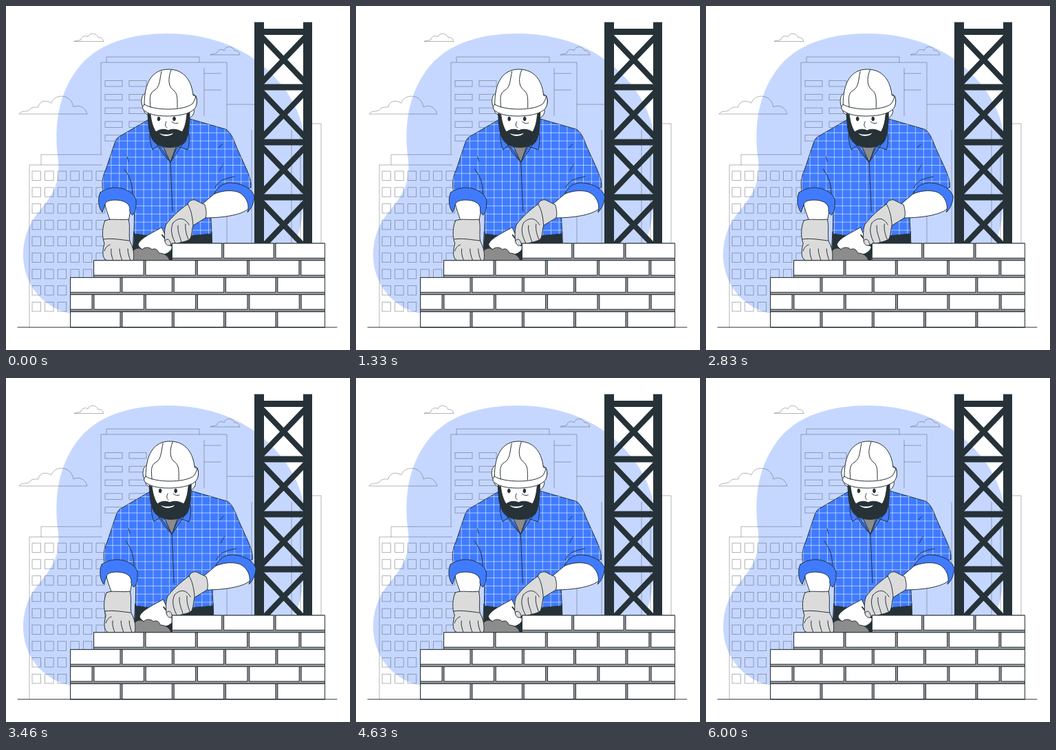
These frames come from a looping animation (500 by 500 pixels, 6.04 s). An HTML page:

```html
<!DOCTYPE html>
<html lang="en">
<head>
<meta charset="utf-8">
<title>Bricklayer</title>
<style>
html, body { margin: 0; width: 100%; height: 100%; overflow: hidden; background: #fff }
svg { display: block; width: 100vw; height: 100vh }
.thin { fill: none; stroke: #263238; stroke-opacity: .45; stroke-width: .8 }
.ink { stroke: #263238; stroke-width: 1; stroke-linejoin: round; stroke-linecap: round }
.line { fill: none }
.blue { fill: #407bff }
.check { fill: url(#check); stroke: none }
.white { fill: #fff }
.glove { fill: #dbdbdb }
.gray { fill: #8c8c8c }
.dark { fill: #263238 }
</style>
</head>
<body>
<svg viewBox="0 0 500 500">
  <defs>
    <pattern id="check" x="176" y="172" width="11.8" height="11.8" patternUnits="userSpaceOnUse">
      <path d="M0 .5H11.8M.5 0V11.8" stroke="#fff" stroke-opacity=".6" stroke-width=".9"/>
    </pattern>
    <path id="shirt" d="M209 164L166 189C161 191 159 196 157 202L146 235C142 246 138 252 141 270L187 282L186 331C220 337 262 335 299 331L297 290L304 270L356 264C357 254 353 246 350 238L335 205C331 194 326 182 319 179L267 164Z"/>
  </defs>

  <path fill="#c6d7ff" d="M235 40C186 40 132 52 102 94C76 130 70 174 75 217C80 251 72 270 51 295C31 318 22 344 26 375C31 412 60 441 95 447H420V345C436 310 437 240 434 195C430 148 402 109 366 81C335 57 290 40 235 40Z"/>

  <!-- skyline and clouds -->
  <g class="thin">
    <path d="M99 51.500C103 49 106 51 109 49C109 44 116 42 119 45C121 38 132 39 134 46C139 45 141 48 142 51.500Z"/>
    <path d="M297 71C301 69 304 70 307 68C307 63 314 62 317 65C319 57 330 58 332 65C337 64 339 68 340 71Z"/>
    <path d="M19 157C22 152 28 154 33 152C37 146 43 147 47 147C48 138 57 136 66 141C70 127 95 127 98 147C105 143 115 146 118 157Z"/>
    <path d="M146 82V74H281V82M138 215V82H321V345M288 90V160M288 98H313M288 122H313M321 143H361M357 180V345M445 171H458V345M415 180V345M428 180V345"/>
    <path d="M51 231V216H140M34 467V231H140"/>
    <g id="windows"></g>
  </g>

  <g class="dark">
    <path d="M361 23.500H375V345H361ZM432 23.500H445V345H432ZM375 33H432V42H375ZM375 113.500H432V122.500H375ZM375 193.500H432V202.500H375ZM375 273.500H432V282.500H375Z"/>
    <path fill="none" stroke="#263238" stroke-width="8" d="M372 45L435 111M435 45L372 111M372 125L435 191M435 125L372 191M372 205L435 271M435 205L372 271M372 285L435 351M435 285L372 351"/>
  </g>

  <g id="builder" class="ink">
    <path class="dark" d="M186 328H299L300 360H242V370H184Z"/>

    <!-- shirt -->
    <use href="#shirt" class="blue"/>
    <use href="#shirt" class="check"/>
    <path class="line" d="M239 227L242 298M172 237C180 249 183 254 184 274M176 219L178 226M304 264C308 256 312 252 332 248M309 206L314 201M310 240C313 234 314 232 316 230M297 292L296 281"/>
    <path class="gray" d="M228 202H248L239 227Z"/>
    <path class="blue" d="M212 174C209 182 207 193 213 209L222 202L239 227C230 218 222 208 216 194ZM264 176C267 188 267 200 264 209L249 204L239 227C247 215 256 204 261 192Z"/>

    <!-- head -->
    <path class="white" d="M205 147C198 146 199 157 207 158ZM266 147C276 143 276 160 266 163Z"/>
    <path class="white" d="M207 154H266C267 176 262 198 238 198C216 198 208 177 207 154Z"/>
    <path class="dark" d="M206 157C207 176 208 190 216 198C226 208 250 208 260 198C266 189 267 171 267 153L263 157C262 168 260 177 256 183C250 179 241 178 236 181C230 178 223 179 218 183C213 176 211 166 210 158Z"/>
    <path class="white" stroke="none" d="M223 185C230 188 238 187 243 184.500C240 190 228 190.500 223 185Z"/>
    <path class="line" d="M233 168C231 172 231 175 234 177M241 168C244 171 247 171 250 170"/>
    <ellipse class="dark" cx="222" cy="164" rx="1.800" ry="2.900"/>
    <ellipse class="dark" cx="244.500" cy="164" rx="1.800" ry="2.900"/>
    <path class="white" d="M203 127C197 127 195 140 199 147H274C279 143 279 130 272 128Z"/>
    <path class="white" d="M201 143C201 112 212 92 236 92C260 92 270 110 272 130L276 131C278 137 278 143 275 148C270 156 253 160 234 160C218 160 205 157 199 150C198 147 199 144 201 143Z"/>
    <path class="line" d="M201 143C214 152 258 153 271 142C274 138 275 134 276 131M226 95C223 108 224 118 215 123C208 127 209 136 210 147M240 93C235 106 236 117 243 122C250 127 249 136 249 148"/>

    <!-- trowel and mortar -->
    <path class="white" d="M226 322C212 330 196 337 192 346C193 353 202 357 222 362C232 362 239 358 242 351L231 332Z"/>
    <path class="line" stroke-width="2" d="M227 333L239 348"/>
    <path class="gray" d="M184 371V357C188 351 195 351 198 354C201 350 209 350 212 354C217 351 221 355 222 359C229 359 237 363 238 371Z"/>

    <!-- left arm -->
    <path class="white" d="M143 284C145 296 149 304 152 314H178C179 306 181 300 181 292L170 280H150Z"/>
    <path class="blue" d="M137 271C148 263 162 262 174 267C185 272 190 279 189 286C189 294 188 300 184 304C181 302 179 299 180 294C179 286 170 282 159 282C150 282 145 284 144 288L140 300C134 293 133 279 137 271Z"/>
    <path class="glove" d="M144 312C152 308 167 312 178 310C181 320 178 332 180 342C185 351 187 361 185 370H147C138 367 141 353 143 345C139 335 140 320 144 312Z"/>
    <path class="line" d="M142 339C154 337 168 340 179 341M153 353C152 359 154 365 156 370M165 353C165 359 167 365 169 370M177 353C177 359 179 365 181 370M143 356C144 352 147 348 151 347"/>

    <!-- right arm -->
    <path class="white" d="M284 289L304 272C320 266 340 266 350 274L354 293C346 303 318 308 288 308Z"/>
    <path class="blue" d="M303 273C307 262 318 256 329 257C346 259 358 266 361 277C360 287 357 294 351 300C355 288 348 274 336 270C325 267 312 269 303 273Z"/>
    <path class="glove" d="M264 288C266 283 270 281 275 282L289 289C291 296 292 303 290 308L272 319C270 324 271 331 268 338C263 343 253 343 247 346L240 347C236 350 232 347 231 342C230 333 230 324 233 317C241 307 251 297 264 288Z"/>
    <path class="line" d="M264 288C269 296 271 306 272 319M243 315C238 324 241 336 247 346M250 319C249 328 253 335 255 343M261 317C260 326 263 334 265 339M231 341C235 337 238 339 240 347M243 315C252 306 260 308 266 318"/>
  </g>

  <g id="wall" class="ink"></g>
  <path class="ink line" d="M17 467H481"/>
</svg>
<script>
const get = id => document.getElementById(id);
const rect = (x, y, w, h, fill) => `<rect x="${x}" y="${y}" width="${w}" height="${h}" fill="${fill}"/>`;

let panes = '';
for (let row = 0; row < 9; row++)
  for (let col = 0; col < 6; col++)
    panes += rect(38 + col * 18.6, 240 + row * 23.8, 12.5, 13.5, 'none');
for (let row = 0; row < 5; row++)
  for (const x of [144, 179]) panes += rect(x, 108.5 + row * 19.8, 25, 8.5, 'none');
get('windows').innerHTML = panes;

// Each course: left edge and x of a full brick
const courses = [[241.7, 241.7], [128, 128], [94, 94], [94, 53], [94, 94]];
const right = 463.5, pitch = 24.85;
let bricks = '';
courses.forEach(([left, start], row) => {
  const y = 345 + row * pitch;
  const last = row === courses.length - 1;
  bricks += rect(left, y, right - left, last ? 467 - y : pitch, '#999');
  for (let x = start; x < 460; x += 75.3) {
    const from = Math.max(x, left), to = Math.min(x + 72, right);
    bricks += rect(from, y, to - from, last ? 467 - y : 21.4, '#fff');
  }
});
get('wall').innerHTML = bricks;

// Sideways shake, one stop every 600 ms
const stops = [0, -1, 2, -4, 4, -4, 4, -4, 2, -1, 0, 0];
const builder = get('builder');
function draw() {
  const p = Math.min(performance.now() % 6040 / 600, 10);
  const i = Math.floor(p);
  const x = stops[i] + (stops[i + 1] - stops[i]) * (p - i);
  builder.setAttribute('transform', `translate(${x.toFixed(3)})`);
  requestAnimationFrame(draw);
}
draw();
</script>
</body>
</html>
```
